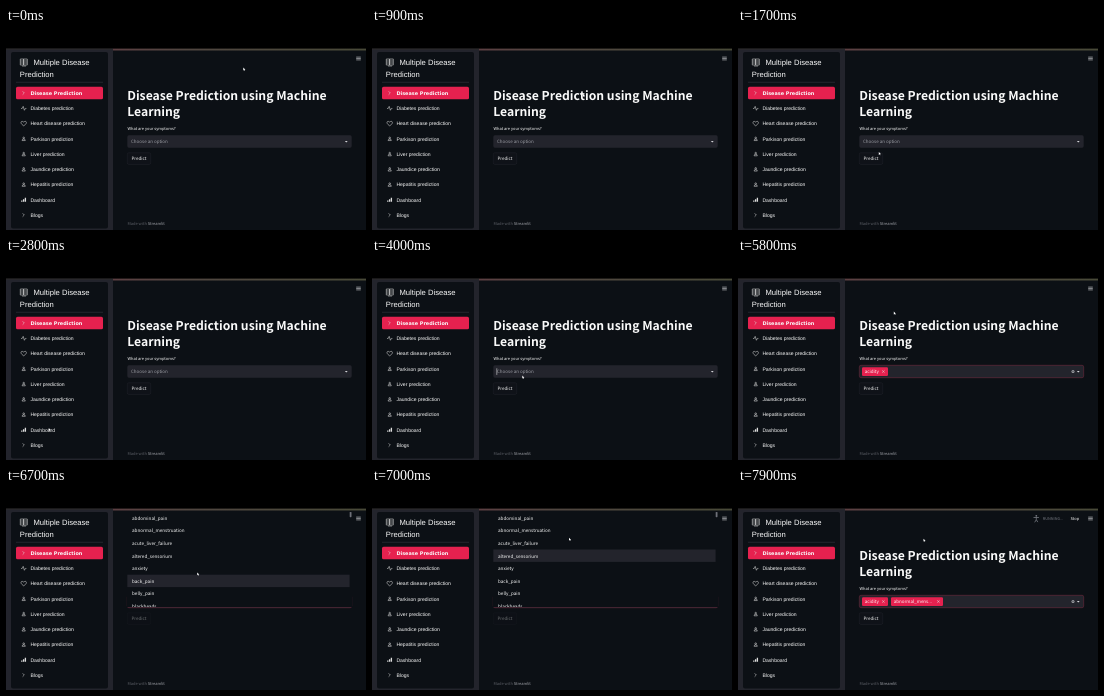
An HTML page for the animation above (8 s loop, 360 by 202 pixels).

```html
<!DOCTYPE html>
<html lang="en">
<head>
<meta charset="utf-8">
<title>Disease Prediction</title>
<style>
  html, body { margin: 0; height: 100%; overflow: hidden; background: #000; }
  svg { display: block; width: 100vw; height: 100vh; text-rendering: geometricPrecision; }
  text { fill: #fafafa; font-family: "Noto Sans CJK JP", "Noto Sans CJK SC", "Noto Sans CJK", "Open Sans", sans-serif; }
  .side text { font-family: "Liberation Sans", Arial, sans-serif; font-size: 5.05px; }
  .side .head { font-size: 7.65px; }
  .side .active { font: bold 4.95px "DejaVu Sans", sans-serif; }
  .line { fill: none; stroke: #ddd; stroke-width: .55; }
  .small { font-size: 4px; font-weight: 500; }
  .body { font-size: 4.5px; font-weight: 500; }
  .option { font-size: 4.6px; font-weight: 500; }
  .muted { fill: #9b9da4; }
  .title { font-size: 12.2px; font-weight: bold; }
</style>
</head>
<body>
<svg viewBox="0 0 360 202" preserveAspectRatio="none">
  <defs>
    <linearGradient id="bar">
      <stop offset="0" stop-color="#5c3f42"/><stop offset=".3" stop-color="#504640"/>
      <stop offset="1" stop-color="#494a38"/>
    </linearGradient>
    <clipPath id="menuClip"><rect x="121" y="23" width="225" height="96"/></clipPath>
  </defs>
  <rect y="21" width="360" height="181" fill="#0c1015"/>
  <rect y="21" width="107" height="181" fill="#23242c"/>
  <rect y="20.4" width="107" height="1.2" fill="#2b2a2b"/>
  <rect x="107" y="20.6" width="253" height="1.9" fill="url(#bar)"/>

  <g class="side">
    <rect x="5" y="24" width="97" height="176.5" rx="2" fill="#0c1015"/>
    <path class="line" d="M14.3 31h3.3v6h-3.3zM17.6 31h3.7v6h-3.7zM14.3 33h7M14.3 35h7M16 38h4"/>
    <text class="head" x="27.5" y="37.4">Multiple Disease</text>
    <text class="head" x="13.8" y="48.8">Prediction</text>
    <path d="M10 54.3h87" stroke="#33353c" stroke-width=".6"/>
    <rect x="10" y="58.8" width="87" height="12.5" rx="1.6" fill="#e6214f"/>
    <g id="nav"></g>
  </g>

  <path d="M350.2 29.1h4.6M350.2 30.5h4.6M350.2 31.9h4.6" stroke="#b4b5b9" stroke-width=".7"/>
  <g id="running">
    <circle cx="298.3" cy="27.8" r=".9" fill="#777a82"/>
    <path d="M295.5 29.5h5.4M298.3 29.3v2.4l-1.6 2.6M298.3 31.7l1.5 2.4" fill="none" stroke="#777a82" stroke-width=".8"/>
    <text x="304.8" y="31.7" font-size="3.85" style="fill:#777a82">RUNNING...</text>
    <text class="small" x="332.5" y="31.8">Stop</text>
  </g>
  <text class="title" x="121.2" y="72">Disease Prediction using Machine</text>
  <text class="title" x="121.2" y="88">Learning</text>
  <text class="small" x="121.5" y="102">What are your symptoms?</text>

  <rect id="field" x="121.3" y="107.3" width="224.4" height="12.4" rx="1.6" fill="#23242c" stroke-width=".5"/>
  <text id="hint" class="body muted" x="125" y="115.2">Choose an option</text>
  <path id="caret" d="M124.8 110.3v6.6" stroke="#fafafa" stroke-width=".5"/>
  <path d="M338.9 112.9h2.8l-1.4 1.5z" fill="#d6d6da"/>
  <g id="clear">
    <circle cx="335" cy="113.5" r="1.5" fill="#a4a5aa"/>
    <path d="M334.3 112.8l1.4 1.4m0-1.4l-1.4 1.4" stroke="#23242c" stroke-width=".5"/>
  </g>
  <g id="tags"></g>

  <g id="predict">
    <rect x="121.3" y="124.8" width="23.4" height="11.6" rx="1.5" fill="#0f1218" stroke="#22252c" stroke-width=".5"/>
    <text class="body" x="125.4" y="132.2">Predict</text>
  </g>
  <text class="small" x="121.5" y="197.2" style="fill:#5c5f66;font-weight:400">Made with <tspan fill="#a0a2a8" font-weight="500">Streamlit</tspan></text>

  <g id="menu" clip-path="url(#menuClip)">
    <rect x="121" y="23" width="225" height="96" fill="#0c1015"/>
    <rect id="hover" x="121.3" width="222.3" height="12.4" fill="#23242c"/>
    <g id="options"></g>
    <rect x="343.7" y="24" width="1.8" height="5.2" rx=".6" fill="#6e7078"/>
  </g>
  <path id="cursor" d="M0 0V2.9L.8 2.3 1.3 3.3 1.7 3.1 1.2 2.1H2.1Z" fill="#fff"/>
</svg>
<script>
const $ = id => document.getElementById(id);
const show = (id, on) => $(id).style.display = on ? '' : 'none';

const icons = {
  chevron: 'M16.6 -1.7l1.7 1.7-1.7 1.7',
  pulse: 'M15 .2h1.2l1-2.1 1.2 3.9 1-1.8h1',
  heart: 'M17.7 2.3C13 -.6 15.4 -3.5 17.7 -1.4 20 -3.5 22.4 -.6 17.7 2.3Z',
  person: 'M16.9 -.9a.8 .8 0 1 0 1.6 0a.8 .8 0 1 0-1.6 0M16.1 1.8q0-1.6 1.6-1.6t1.6 1.6Z',
  chart: 'M15.8 2v-1.3M17.6 2v-2.5M19.4 2v-4'
};
const nav = [
  ['Disease Prediction', 'chevron'], ['Diabetes prediction', 'pulse'],
  ['Heart disease prediction', 'heart'], ['Parkison prediction', 'person'],
  ['Liver prediction', 'person'], ['Jaundice prediction', 'person'],
  ['Hepatitis prediction', 'person'], ['Dashboard', 'chart'], ['Blogs', 'chevron']
];
$('nav').innerHTML = nav.map(([label, icon], i) => `<g transform="translate(0 ${65 + 15.25 * i})">
  <path class="line" d="${icons[icon]}" ${icon == 'chart' ? 'style="stroke-width:1.3"' : ''}/>
  <text x="24.4" y="1.8" class="${i ? '' : 'active'}">${label}</text></g>`).join('');

const symptoms = ['abdominal_pain', 'abnormal_menstruation', 'acidity', 'acute_liver_failure',
  'altered_sensorium', 'anxiety', 'back_pain', 'belly_pain', 'blackheads'];
const ROW = 12.6, MENU_TOP = 23.7;
const optionList = names => names.map((name, i) =>
  `<text class="option" x="126" y="${MENU_TOP + ROW * (i + .5) + 1.7}">${name}</text>`).join('');
const allOptions = optionList(symptoms);
const restOptions = optionList(symptoms.filter(name => name != 'acidity'));

const tag = (label, x, width) => `<rect x="${x}" y="109.2" width="${width}" height="8.8" rx="1.2" fill="#e6214f"/>
  <text class="body" x="${x + 2.7}" y="115.2">${label}</text>
  <path class="line" d="M${x + width - 5.8} 112.3l2.4 2.4m0-2.4l-2.4 2.4"/>`;
const firstTag = tag('acidity', 124, 26);
const bothTags = firstTag + tag('abnormal_mens...', 153, 52);

// Pointer stops: time, x, y
const path = [
  [0, 237.3, 39.6], [900, 211, 66], [1700, 140.8, 124], [1800, 126, 131], [2200, 62, 165],
  [2700, 40, 184], [3500, 62, 72], [3700, 95, 88], [3900, 150, 117], [4000, 150.3, 117.6],
  [4100, 150, 116], [4500, 158, 82], [4600, 159.8, 77], [5300, 155.8, 53.6], [5800, 155.8, 53.6],
  [6300, 182, 112], [6400, 184, 112], [6900, 196, 66], [7000, 197, 49.8], [7200, 186, 46],
  [7500, 186, 46], [7900, 185.5, 50.7]
];
function pointer(t) {
  const i = path.findIndex(p => p[0] > t);
  if (i < 0) return path.at(-1).slice(1);
  const [t0, x0, y0] = path[i - 1], [t1, x1, y1] = path[i];
  const k = (t - t0) / (t1 - t0);
  return [x0 + (x1 - x0) * k, y0 + (y1 - y0) * k];
}

let last = -1;
function draw(now) {
  const t = Math.floor(now % 8000 / 100) * 100;
  if (t != last) {
    last = t;
    const between = (a, b) => t >= a && t < b;
    const picked = t >= 5500;
    $('cursor').setAttribute('transform', `translate(${pointer(t)})`);
    show('menu', between(4100, 5500) || between(6400, 7500));
    // The highlight trails the pointer by one step
    const row = Math.min(7, Math.floor((pointer(Math.max(0, t - 100))[1] - MENU_TOP) / ROW));
    $('hover').setAttribute('y', MENU_TOP + ROW * row);
    $('options').innerHTML = picked ? restOptions : allOptions;
    $('tags').innerHTML = t >= 7500 ? bothTags : picked ? firstTag : '';
    $('field').setAttribute('stroke', t >= 4100 ? '#7d2a40' : 'none');
    show('hint', !picked);
    show('caret', between(3900, 5500));
    show('clear', picked);
    show('running', t >= 6400);
    $('predict').setAttribute('opacity', between(6500, 7500) ? .4 : 1);
  }
  requestAnimationFrame(draw);
}
draw(0);
</script>
</body>
</html>
```
